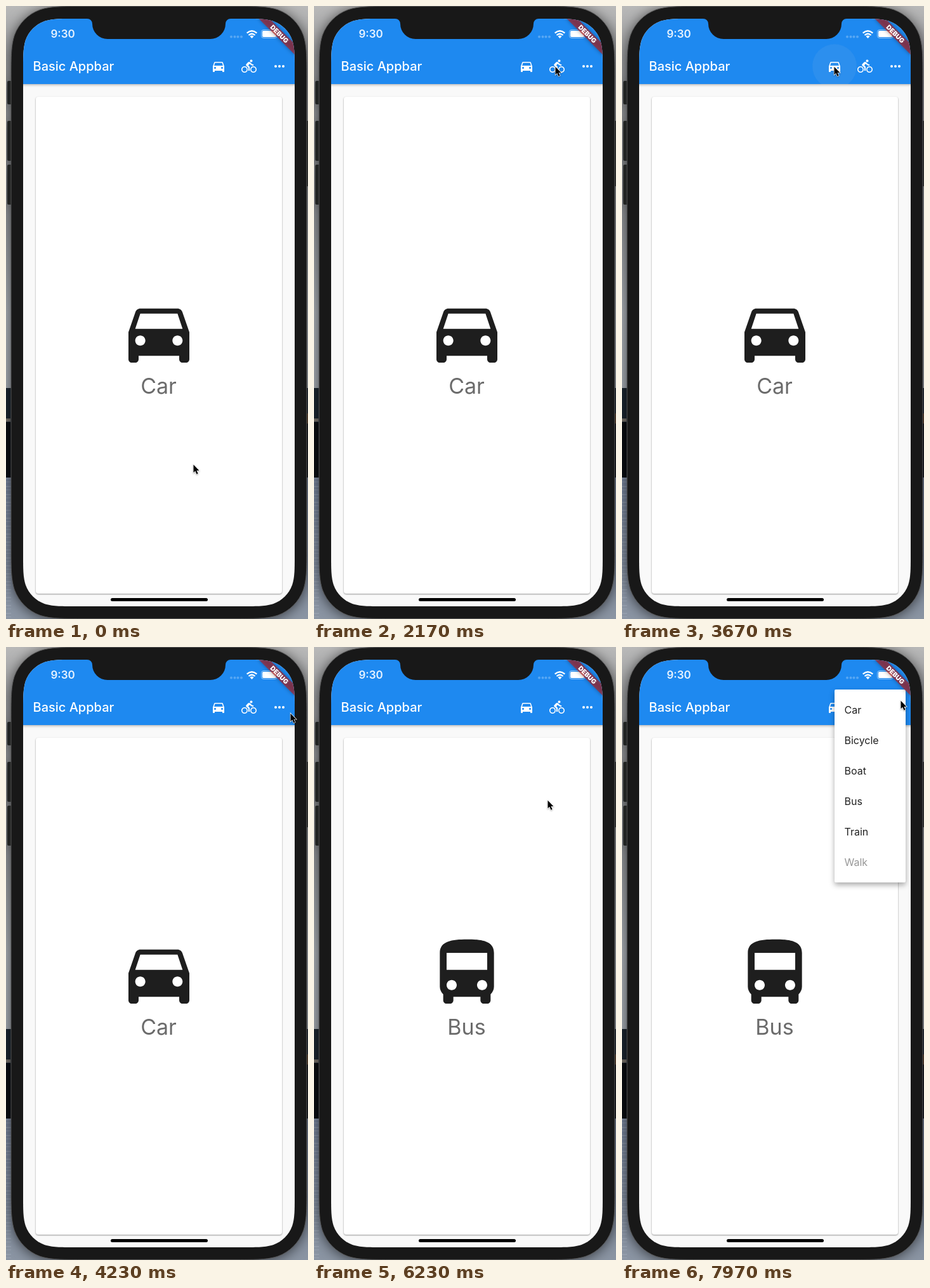
These frames come from a looping animation (476 px wide and 966 px high, 8 s). An HTML page:

```html
<!DOCTYPE html>
<html lang="en">
<head>
<meta charset="utf-8">
<title>Basic Appbar</title>
<style>
  html, body { margin: 0; width: 100%; height: 100%; overflow: hidden; }
  svg { display: block; width: 476px; height: 966px; font-family: Inter, Roboto, sans-serif; }
  #phone { filter: drop-shadow(0 2px 10px #0009); }
  #card { filter: drop-shadow(0 1px 1px #0006); }
  #bar { filter: drop-shadow(0 1.5px 2px #0005); }
  #panel { filter: drop-shadow(0 4px 4px #0005); }
  #band { filter: drop-shadow(0 0 3px #0008); }
  #pointer { filter: drop-shadow(0 1px 1px #0005); }
</style>
</head>
<body>
<svg viewBox="0 0 476 966">
  <defs>
    <linearGradient id="sky" x2="0" y2="1">
      <stop offset="0" stop-color="#b9b9b9"/>
      <stop offset=".08" stop-color="#9a9b9d"/>
      <stop offset=".35" stop-color="#94979b"/>
      <stop offset=".5" stop-color="#adb2b8"/>
      <stop offset="1" stop-color="#959ea9"/>
    </linearGradient>
    <linearGradient id="water" x2="0" y2="1">
      <stop offset="0" stop-color="#75829a"/>
      <stop offset="1" stop-color="#8b95a3"/>
    </linearGradient>
    <clipPath id="screen"><path id="glass"/></clipPath>
    <clipPath id="barClip"><rect x="27" y="20" width="428" height="103"/></clipPath>
    <path id="car" d="M18.92 6.01C18.72 5.42 18.16 5 17.5 5h-11c-.66 0-1.21.42-1.42 1.01L3 12v8c0 .55.45 1 1 1h1c.55 0 1-.45 1-1v-1h12v1c0 .55.45 1 1 1h1c.55 0 1-.45 1-1v-8l-2.08-5.99zM6.5 16c-.83 0-1.5-.67-1.5-1.5S5.67 13 6.5 13s1.5.67 1.5 1.5S7.33 16 6.5 16zm11 0c-.83 0-1.5-.67-1.5-1.5s.67-1.5 1.5-1.5 1.5.67 1.5 1.5-.67 1.5-1.5 1.5zM5 11l1.5-4.5h11L19 11H5z"/>
    <path id="bicycle" d="M15.5 5.5c1.1 0 2-.9 2-2s-.9-2-2-2-2 .9-2 2 .9 2 2 2zM5 12c-2.8 0-5 2.2-5 5s2.2 5 5 5 5-2.2 5-5-2.2-5-5-5zm0 8.5c-1.9 0-3.5-1.6-3.5-3.5s1.6-3.5 3.5-3.5 3.5 1.6 3.5 3.5-1.6 3.5-3.5 3.5zm5.8-10l2.4-2.4.8.8c1.3 1.3 3 2.1 5.1 2.1V9c-1.5 0-2.7-.6-3.6-1.5l-1.9-1.9c-.5-.4-1-.6-1.6-.6s-1.1.2-1.4.6L7.8 8.4c-.4.4-.6.9-.6 1.4 0 .6.2 1.1.6 1.4L11 14v5h2v-6.2l-2.2-2.3zM19 12c-2.8 0-5 2.2-5 5s2.2 5 5 5 5-2.2 5-5-2.2-5-5-5zm0 8.5c-1.9 0-3.5-1.6-3.5-3.5s1.6-3.5 3.5-3.5 3.5 1.6 3.5 3.5-1.6 3.5-3.5 3.5z"/>
    <path id="bus" d="M4 16c0 .88.39 1.67 1 2.22V20c0 .55.45 1 1 1h1c.55 0 1-.45 1-1v-1h8v1c0 .55.45 1 1 1h1c.55 0 1-.45 1-1v-1.78c.61-.55 1-1.34 1-2.22V6c0-3.5-3.58-4-8-4s-8 .5-8 4v10zm3.5 1c-.83 0-1.5-.67-1.5-1.5S6.67 14 7.5 14s1.5.67 1.5 1.5S8.33 17 7.5 17zm9 0c-.83 0-1.5-.67-1.5-1.5s.67-1.5 1.5-1.5 1.5.67 1.5 1.5-.67 1.5-1.5 1.5zm1.5-6H6V6h12v5z"/>
  </defs>

  <!-- backdrop -->
  <rect width="476" height="966" fill="url(#sky)"/>
  <path d="M0 602H476V743H0Z" fill="#1c2631"/>
  <path d="M0 656H476V743H0Z" fill="#0a0d12"/>
  <path d="M0 650h7v5H0Z" fill="#77726b"/>
  <path d="M473 642h3v16h-3Z" fill="#5a3c26"/>
  <path d="M0 743H476V966H0Z" fill="url(#water)"/>
  <path d="M4 744V966" stroke="#a5afbd" stroke-width="8" stroke-dasharray="1.5 4 1 6" opacity=".5"/>

  <!-- phone -->
  <g id="phone">
    <g fill="#222423">
      <rect x="2" y="118" width="9" height="37" rx="2"/>
      <rect x="2" y="181" width="9" height="63" rx="2"/>
      <rect x="2" y="250" width="9" height="63" rx="2"/>
      <rect x="470" y="181" width="6" height="103"/>
    </g>
    <path id="body" fill="#181818" stroke="#555"/>
  </g>

  <g clip-path="url(#screen)">
    <rect x="27" y="20" width="428" height="926" fill="#f9f9f9"/>
    <rect id="card" x="47" y="143" width="388" height="783" rx="4" fill="#fff"/>
    <use id="icon" transform="translate(177 450) scale(5.3333)" fill="#1e1e1e"/>
    <text id="label" x="240.5" y="610.5" font-size="34" text-anchor="middle" fill="#6b6b6b"></text>

    <rect id="bar" x="17" y="10" width="448" height="113" fill="#1e89f0"/>
    <g clip-path="url(#barClip)">
      <circle id="glow" cy="95" r="35" fill="#bcbcbc"/>
      <circle id="splash" cy="95" fill="#c8c8c8"/>
    </g>
    <g fill="#fff">
      <text x="42.500" y="102" font-size="20" font-weight="500">Basic Appbar</text>
      <text x="70.500" y="50.300" font-size="17" font-weight="600" fill="#e6f2ff">9:30</text>
      <use href="#car" x="323" y="83"/>
      <use href="#bicycle" x="371" y="83"/>
      <circle cx="425" cy="95" r="2"/><circle cx="431" cy="95" r="2"/><circle cx="437" cy="95" r="2"/>
      <g fill-opacity=".25">
        <circle cx="355" cy="48.500" r="2"/><circle cx="360.500" cy="48.500" r="2"/>
        <circle cx="365.500" cy="48.500" r="2"/><circle cx="371" cy="48.500" r="2"/>
      </g>
      <path d="M387.500 51l-3-3.200q3-2.400 6 0z"/>
      <path d="M382.500 46q5-4.400 10 0M379.700 42.600q7.800-6.800 15.600 0" fill="none" stroke="#fff" stroke-width="2.300"/>
      <rect x="402.500" y="37.500" width="25" height="13" rx="3.500" fill="none" stroke="#fff" stroke-opacity=".5"/>
      <rect x="404" y="39" width="22" height="10" rx="2"/>
    </g>

    <g id="menu">
      <rect id="panel" y="67" rx="2" fill="#fff"/>
      <rect id="hover" x="335" y="219" width="112" height="48" fill="#bcbcbc"/>
      <g id="items" font-size="16" fill="#212121"></g>
    </g>

    <g transform="translate(455 20) rotate(45)">
      <rect id="band" x="-40" y="28" width="80" height="12" fill="#b71c1c" fill-opacity=".63"/>
      <text y="37.700" font-size="10.200" font-weight="900" text-anchor="middle" fill="#fff">DEBUG</text>
    </g>
  </g>
  <path d="M128 19V20A8 8 0 0 1 136 28A24 24 0 0 0 160 52H322A24 24 0 0 0 346 28A8 8 0 0 1 354 20V19Z" fill="#181818"/>
  <rect x="165" y="933" width="153" height="5" rx="2.500"/>

  <g id="pointer">
    <path transform="translate(.5 .8) scale(.86)" d="M0 0V14.500L3.300 11.500L5.800 17.300L8.300 16.200L5.800 10.600H10.300Z" stroke="#fff" stroke-width="1.600" paint-order="stroke"/>
  </g>
</svg>
<script>
const LOOP = 8000;
const $ = id => document.getElementById(id);
const clamp = v => Math.max(0, Math.min(1, v));
const set = (el, attrs) => { for (const k in attrs) el.setAttribute(k, attrs[k]); };

// rounded rectangle with continuous-curvature corners
function smoothRect(x, y, w, h, r) {
  const half = [[0, 1.529], [0, 1.088], [0, 0.868], [0.075, 0.631], [0.169, 0.373]];
  const up = [...half, ...half.map(([a, b]) => [b, a]).reverse()];
  const down = [...up].reverse();
  const corner = (pts, cx, cy, sx, sy) => {
    const [first, ...rest] = pts.map(([a, b]) => `${cx + sx * r * a} ${cy + sy * r * b}`);
    return `${first}C${rest.join(" ")}`;
  };
  return "M" + [
    corner(up, x, y, 1, 1), corner(down, x + w, y, -1, 1),
    corner(up, x + w, y + h, -1, -1), corner(down, x, y + h, 1, -1)
  ].join("L") + "Z";
}
set($("glass"), { d: smoothRect(27, 20, 428, 926, 53) });
set($("body"), { d: smoothRect(8, 0.5, 466, 965, 72) });

// pointer stops: time, x, y
const path = [
  [300, 295, 722], [430, 321, 361], [700, 321, 361], [1370, 391, 121],
  [1700, 380, 95], [2970, 380, 95], [3300, 334, 95], [3750, 334, 95],
  [4230, 448, 104], [4600, 434, 103], [5370, 434, 103], [5690, 368, 241],
  [6230, 368, 241], [6900, 433, 128], [7400, 439, 84]
];
// button taps: press, release, centre x
const taps = [[2220, 2320, 383], [3400, 3490, 335], [4700, 4790, 431], [7570, 7690, 431]];
// menu: open, close
const menus = [[4812, 5800], [7703, 1e9]];
const views = [[0, "Car"], [2330, "Bicycle"], [3500, "Car"], [5800, "Bus"]];

const names = ["Car", "Bicycle", "Boat", "Bus", "Train", "Walk"];
const items = names.map((name, i) => {
  const el = document.createElementNS("http://www.w3.org/2000/svg", "text");
  set(el, { x: 350.5, y: 105 + 48 * i });
  el.textContent = name;
  return $("items").appendChild(el);
});

function pointerAt(t) {
  const n = path.findIndex(p => p[0] > t);
  if (n < 0) return path.at(-1).slice(1);
  if (n === 0) return path[0].slice(1);
  const [a, b] = [path[n - 1], path[n]];
  const u = (t - a[0]) / (b[0] - a[0]), e = u * u * (3 - 2 * u);
  return [1, 2].map(i => a[i] + (b[i] - a[i]) * e);
}

function drawRipple(t) {
  const [press, release, cx] = taps.findLast(p => t >= p[0]) || [1e9, 1e9, 0];
  const fade = 1 - clamp((t - release) / 200);
  const start = 35 * (release - press) / 1000;
  const r = t < release ? 35 * Math.max(0, t - press) / 1000 : start + (35 - start) * clamp((t - release) / 35);
  set($("glow"), { cx, opacity: 0.4 * fade * clamp((t - press) / 200) });
  set($("splash"), { cx, r, opacity: t < press ? 0 : 0.4 * fade });
}

function drawMenu(t) {
  const [open, close] = menus.findLast(m => t >= m[0]) || [1e9, 1e9];
  const p = t < close ? clamp((t - open) / 300) : clamp((1 - (t - close) / 300) * 1.5);
  const unit = 1 / (names.length + 1.5);
  const width = 112 * clamp(p / unit);
  set($("menu"), { opacity: clamp(p * 3), display: p ? "inline" : "none" });
  set($("panel"), { x: 447 - width, width, height: 304 * clamp(p / (unit * names.length)) });
  items.forEach((el, i) => set(el, { opacity: clamp((p - (i + 1) * unit) / (1.5 * unit)) }));
  const held = clamp((t - 5710) / 200) * (1 - clamp((t - 5800) / 200));
  set($("hover"), { opacity: 0.4 * held });
}

function draw(t) {
  const name = views.findLast(v => t >= v[0])[1];
  set($("icon"), { href: "#" + name.toLowerCase() });
  $("label").textContent = name;
  drawRipple(t);
  drawMenu(t);
  set($("pointer"), { transform: `translate(${pointerAt(t)})` });
}

const begin = performance.now();
function tick() {
  draw((performance.now() - begin) % LOOP);
  requestAnimationFrame(tick);
}
tick();
</script>
</body>
</html>
```
